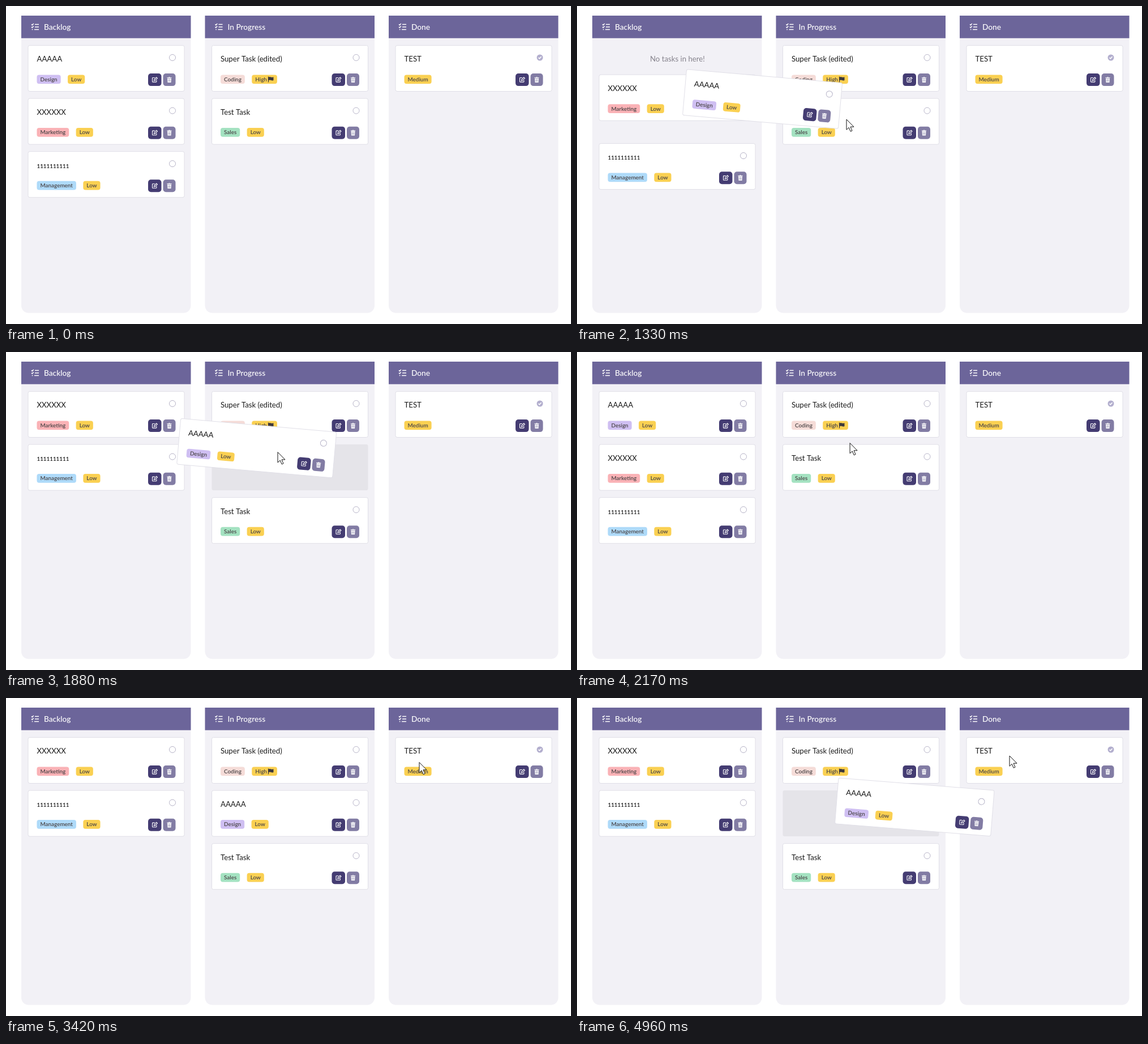
Recreate the animation shown at these times as an HTML page with a canvas. Size 998 px wide and 561 px high, loop 5000 ms.

```html
<!DOCTYPE html>
<html lang="en">
<head>
<meta charset="utf-8">
<title>Task board</title>
<style>
  html, body { margin: 0; width: 100%; height: 100%; overflow: hidden; background: #fff; }
  canvas { display: block; width: 998px; height: 561px; }
</style>
</head>
<body>
<canvas id="stage" width="998" height="561"></canvas>
<script>
const ctx = document.getElementById('stage').getContext('2d');
const LOOP = 5000;
const CARD_W = 276, CARD_H = 81;
const TILT = 5 * Math.PI / 180;
const COLORS = {
  Design: '#cfbff2', Marketing: '#fab2b6', Management: '#aedaf9',
  Coding: '#f5dcd8', Sales: '#a4e2c1'
};
const PRIORITY = '#fad052';

const TASKS = {
  a: { title: 'AAAAA', tags: ['Design', 'Low'] },
  x: { title: 'XXXXXX', tags: ['Marketing', 'Low'] },
  one: { title: '1111111111', tags: ['Management', 'Low'] },
  sup: { title: 'Super Task (edited)', tags: ['Coding', 'High'] },
  test: { title: 'Test Task', tags: ['Sales', 'Low'] },
  done: { title: 'TEST', tags: ['Medium'], checked: true }
};

const ICON = {
  edit: new Path2D('M.2-3.6H-3.4Q-4.2-3.6-4.2-2.8V3.2Q-4.2 4-3.4 4H2.4Q3.2 4 3.2 3.2V.8M-1.3 1.6L-.8-.5L3-4.3L4.7-2.6L.9 1.2Z'),
  bin: new Path2D('M-4-4.2H-1.5L-1-4.9H1L1.5-4.2H4V-3H-4ZM-3.5-2.4H3.5L3 4.8H-3Z'),
  slots: new Path2D('M-1.6-1V3.4M0-1V3.4M1.6-1V3.4'),
  flag: new Path2D('M0 0H1.2V.9Q3-.1 5 .9T9.6.7V6.4Q7.4 7.4 5.2 6.5T1.2 6.6V10H0Z'),
  list: new Path2D('M6 1H13M6 5.5H13M5 10H13M0 1L1.3 2.3L3.8-.4M0 5.5L1.3 6.8L3.8 4.1M.8 10H2.4'),
  tick: new Path2D('M-2.5 0L-.7 1.8L2.6-1.7'),
  arrow: new Path2D('M0 0V18.3L4.2 14.4L7.2 21.3L10 20L7 13.2H13Z')
};

// Key points: time, x, y
const DRAG_1 = [[865, 0, 0], [1330, 150.2, 54.1], [1580, 237.5, 65.1], [2130, 289, 55]];
const DRAG_2 = [[4872, 0, 0], [4960, 94.8, -11.2]];
const CURSOR = [[400, 190, 105], [880, 375, 185], [1330, 476, 200], [1580, 480, 202],
  [2100, 480, 161], [3420, 730, 113.5], [4400, 560, 185], [4960, 764, 102]];

const clamp = p => Math.min(1, Math.max(0, p));
const linear = p => p;
const smooth = p => p * p * (3 - 2 * p);
const ramp = (t, start, length) => smooth(clamp((t - start) / length));

function along(path, t, ease) {
  const i = Math.max(1, path.findIndex((point, n) => point[0] >= t || n === path.length - 1));
  const [t0, x0, y0] = path[i - 1], [t1, x1, y1] = path[i];
  const p = ease(clamp((t - t0) / (t1 - t0)));
  return [x0 + (x1 - x0) * p, y0 + (y1 - y0) * p];
}

function box(x, y, w, h, r, fill, stroke) {
  ctx.beginPath();
  ctx.roundRect(x, y, w, h, r);
  ctx.fillStyle = fill;
  ctx.fill();
  if (stroke) {
    ctx.strokeStyle = stroke;
    ctx.lineWidth = 1;
    ctx.stroke();
  }
}

function text(str, x, y, size, weight, color) {
  ctx.font = `${weight} ${size}px Raleway, Lato, sans-serif`;
  ctx.fillStyle = color;
  ctx.fillText(str, x, y);
  return ctx.measureText(str).width;
}

function icon(path, x, y, color, line) {
  ctx.save();
  ctx.translate(x, y);
  ctx.fillStyle = ctx.strokeStyle = color;
  ctx.lineWidth = line;
  if (line) ctx.stroke(path);
  else ctx.fill(path);
  ctx.restore();
}

// Draws a tag fitted to its label and returns its width
function tag(label, x) {
  const flagged = label === 'High';
  ctx.font = '600 9.9px Raleway, Lato, sans-serif';
  const inner = ctx.measureText(label).width;
  const width = inner + (flagged ? 24 : 12);
  box(x, 52, width, 15.7, 4, COLORS[label] || PRIORITY);
  text(label, x + 6, 63.3, 9.9, 600, '#4b4648');
  if (flagged) icon(ICON.flag, x + inner + 8, 55, '#3e393b');
  return width;
}

function card(task, x, y, angle = 0) {
  ctx.save();
  ctx.translate(x + CARD_W / 2, y + CARD_H / 2);
  ctx.rotate(angle);
  ctx.translate(-CARD_W / 2, -CARD_H / 2);
  box(0, 0, CARD_W, CARD_H, 3, '#fff', '#e0dfe7');
  // Digits are set at x-height, like old-style figures
  const digits = /^\d/.test(task.title);
  text(task.title, 15.5, 28.8, digits ? 9.8 : 13.2, digits ? 600 : 400, '#1c1c1c');

  ctx.beginPath();
  ctx.arc(255, 21.5, 5.5, 0, 7);
  if (task.checked) {
    ctx.fillStyle = '#b3afce';
    ctx.fill();
    icon(ICON.tick, 255, 21.5, '#fff', 1.5);
  } else {
    ctx.strokeStyle = '#b7b4c8';
    ctx.lineWidth = 1;
    ctx.stroke();
  }

  let left = 15.5;
  for (const label of task.tags) left += tag(label, left) + 12.4;

  box(212, 49.6, 23.5, 22, 5, '#443c72');
  icon(ICON.edit, 223.7, 60.6, '#fff', 1.1);
  box(238.5, 49.6, 22, 22, 5, '#827ca4');
  icon(ICON.bin, 249.5, 60.6, '#fff');
  icon(ICON.slots, 249.5, 60.6, '#827ca4', 0.6);
  ctx.restore();
}

const colX = col => 27 + col * 324.5;
const slotX = col => colX(col) + 12;
const slotY = row => 69.5 + row * 93.6;
const put = (id, col, row) => card(TASKS[id], slotX(col), slotY(row));
const gap = (col, row) => box(slotX(col), slotY(row), CARD_W, CARD_H, 3, '#e5e4e9');

function column(name, col) {
  const x = colX(col);
  box(x, 17, 299.5, 524.5, [0, 0, 13, 13], '#f2f1f6');
  box(x, 17, 299.5, 39.7, 0, '#6c659a');
  icon(ICON.list, x + 18, 31.4, '#fff', 1.5);
  text(name, x + 40, 41.5, 13.7, 500, '#fff');
}

function dragged(col, row, path, t) {
  const [dx, dy] = along(path, t, linear);
  const angle = TILT * ramp(t, path[0][0] - 5, 115);
  card(TASKS.a, slotX(col) + dx, slotY(row) + dy, angle);
}

function draw(t) {
  ctx.fillStyle = '#fff';
  ctx.fillRect(0, 0, 998, 561);
  ['Backlog', 'In Progress', 'Done'].forEach(column);
  put('sup', 1, 0);
  put('done', 2, 0);

  const firstDrag = t >= 850 && t < 2130;
  const secondDrag = t >= 4850;
  const moved = t >= 3000;
  // Cards glide to their new rows during the drag, then jump back until the move is saved
  const shift = start => (firstDrag ? ramp(t, start, 200) : Number(moved));

  if (firstDrag && t < 1230) gap(0, 0);
  if (secondDrag || (firstDrag && t >= 1400)) gap(1, 1);
  if (t >= 1230 && t < 1420) text('No tasks in here!', 129, 98.3, 13.2, 400, '#85828c');

  put('one', 0, 2 - shift(1282));
  put('x', 0, 1 - shift(1238));
  put('test', 1, 1 + shift(1400));

  if (firstDrag) dragged(0, 0, DRAG_1, t);
  else if (secondDrag) dragged(1, 1, DRAG_2, t);
  else put('a', Number(moved), Number(moved));

  if (t >= CURSOR[0][0]) {
    const [x, y] = along(CURSOR, t, smooth);
    icon(ICON.arrow, x, y, '#fff');
    icon(ICON.arrow, x, y, '#111', 1);
  }
}

const start = performance.now();
function frame() {
  draw((performance.now() - start) % LOOP);
  requestAnimationFrame(frame);
}
frame();
</script>
</body>
</html>
```
